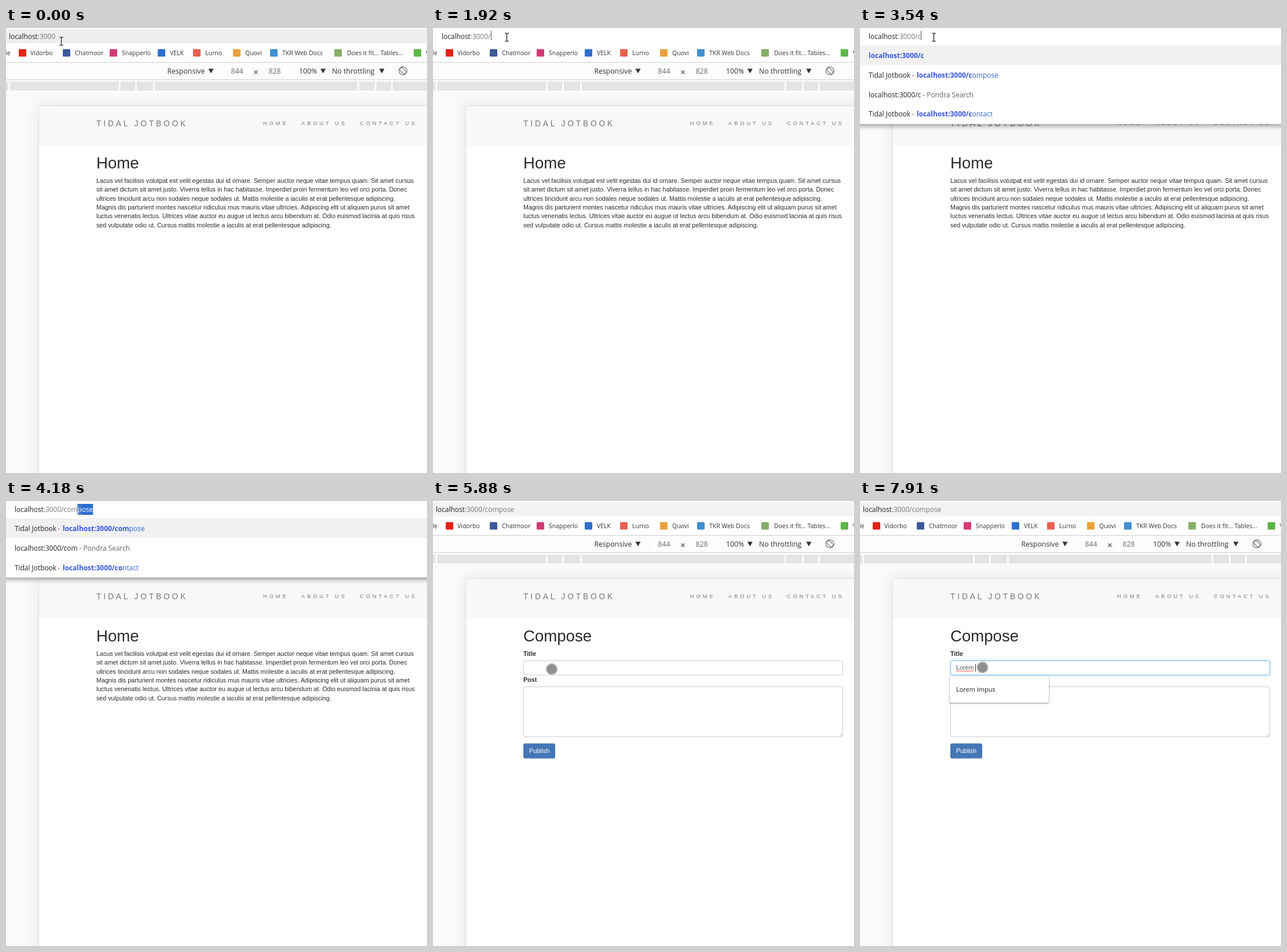
An HTML page for the animation above (8000 ms loop, 727 px wide and 770 px high).

```html
<!DOCTYPE html>
<html lang="en">
<head>
<meta charset="utf-8">
<title>Composing a post</title>
<style>
  html, body { margin: 0; width: 100%; height: 100%; overflow: hidden; background: #fafafa; }
  svg { display: block; width: 727px; height: 770px; }
  text { white-space: pre; font-family: "Open Sans", sans-serif; }
  .page text { font: 10.73px "Liberation Sans", Arial, sans-serif; fill: #2b2b2b; }
  .page .brand { font-size: 13.8px; letter-spacing: 3.83px; fill: #777; }
  .page .nav { font-size: 9.2px; letter-spacing: 4px; fill: #777; }
  .page .heading { font-size: 27.6px; }
  .page .label { font-weight: bold; }
  .field { fill: #fff; stroke: #ccc; }
  .focused { stroke: #7db8ea; filter: drop-shadow(0 0 2.5px #66afe980); }
  .tools { font-size: 12.3px; fill: #333; }
  .tools .size { fill: #666; }
  .bookmarks { font-size: 10.5px; fill: #333; }
  .omnibox { font-size: 11.9px; fill: #202124; }
  .path { fill: #777; }
  .selected { fill: #fff; }
  .dim { fill: #5f6368; }
  .link { fill: #3566d6; }
  .match { fill: #3557e0; font-weight: bold; }
</style>
</head>
<body>
<svg viewBox="0 0 727 770">
  <rect width="727" height="770" fill="#fafafa"/>

  <g class="page">
    <rect x="56" y="134" width="800" height="800" fill="#fff" style="filter:drop-shadow(0 0 11px #00000018)"/>
    <rect x="56" y="134" width="700" height="69.5" fill="#f8f8f8"/>
    <path d="M727 134.5H56.5V770" fill="none" stroke="#dfdfdf"/>
    <text class="brand" x="156" y="170">TIDAL JOTBOOK</text>
    <text class="nav" x="444" y="168">HOME</text>
    <text class="nav" x="510" y="168">ABOUT US</text>
    <text class="nav" x="611" y="168">CONTACT US</text>

    <g id="home"><text class="heading" x="156" y="243">Home</text></g>

    <g id="compose">
      <text class="heading" x="156" y="243">Compose</text>
      <text class="label" x="156" y="268">Title</text>
      <rect id="titleField" class="field" x="156.5" y="276.5" width="551" height="24.5" rx="3"/>
      <text id="title" x="166" y="292" style="fill:#555"></text>
      <path id="squiggle" fill="none" stroke="#e33" stroke-width=".9"/>
      <rect id="titleCaret" y="282" width="1" height="13" fill="#333"/>
      <text class="label" x="156" y="313">Post</text>
      <rect class="field" x="156.5" y="321.5" width="551" height="86.5" rx="3"/>
      <path d="M703 407l4-4M706 407l1-1" stroke="#888" stroke-width=".8"/>
      <rect x="156" y="419.5" width="55" height="26" rx="3" fill="#4577b6"/>
      <text x="166" y="436" style="fill:#fff">Publish</text>
      <g id="suggestion">
        <rect x="155" y="303" width="171" height="46" rx="2" fill="#fff" style="filter:drop-shadow(0 1px 1.5px #0007)"/>
        <text x="166" y="330" style="font:500 11px 'Open Sans',sans-serif;fill:#1f1f2b">Lorem impus</text>
      </g>
    </g>
  </g>

  <rect width="727" height="59" fill="#fff"/>
  <g id="bookmarks" class="bookmarks"></g>

  <g class="tools">
    <rect y="60" width="727" height="29" fill="#fcfcfc"/>
    <path d="M0 59.5H727M0 89.5H727" stroke="#cdcdcd"/>
    <path d="M378 65h45v19h-45zM441 65h45v19h-45z" fill="#fff"/>
    <text x="278.5" y="79">Responsive</text>
    <text class="size" x="388.5" y="79">844</text>
    <text class="size" x="453.5" y="79">828</text>
    <text x="506" y="79">100%</text>
    <text x="563" y="79">No throttling</text>
    <path d="M349.5 70.5h9l-4.5 8zM543 70.5h9l-4.5 8zM644.5 70.5h9l-4.5 8z" fill="#333"/>
    <path d="M428.5 73.5l6 6m0-6l-6 6" stroke="#555" stroke-width="1.2"/>
    <g fill="none" stroke="#666" stroke-width="1.1" transform="translate(685.5 74)">
      <rect x="-3" y="-6" width="6" height="12" rx="1" transform="rotate(-45)"/>
      <circle r="7"/>
    </g>
    <path d="M0 93h4v15H0zM7 93h188v15H7zM198 93h25v15h-25zM226 93h28v15h-28zM257 93h350v15H257zM610 93h27v15h-27zM640 93h25v15h-25zM668 93h59v15h-59z" fill="#e4e4e4"/>
  </g>

  <g class="omnibox">
    <g id="dropdown">
      <rect id="panel" x="-30" y="-30" width="790" fill="#fff"/>
      <rect y="30" width="727" height="34" fill="#f1f1f1"/>
      <g id="rows"></g>
    </g>
    <rect id="bar" y="2" width="727" height="24.5"/>
    <rect id="selection" y="5" height="19" fill="#2a6dd2"/>
    <text id="address" y="19"></text>
    <rect id="urlCaret" y="5" width="1" height="16" fill="#555"/>
  </g>

  <g id="pointer">
    <path id="beam" d="M-3.5 -7h2.5l1 1 1-1h2.5M0 -6V6M-3.5 7h2.5l1-1 1 1h2.5" fill="none" stroke="#111" stroke-width="1.2"/>
    <path id="arrow" d="M0 0v15l3.5-3.3 2.3 5 2-.9-2.2-4.9h5z" fill="#fff" stroke="#111"/>
    <circle id="touch" r="9.3" fill="#8f8f8f" stroke="#bdbdbd" stroke-width="1.8"/>
  </g>
</svg>

<script>
const LOOP = 8000, BLINK = 550;
const SITE = 'Tidal Jotbook', HOST = 'localhost', PORT = ':3000';
const el = Object.fromEntries([...document.querySelectorAll('[id]')].map(node => [node.id, node]));

const show = (node, on) => node.setAttribute('display', on ? 'inline' : 'none');
const set = (node, attrs) => Object.entries(attrs).forEach(([k, v]) => node.setAttribute(k, v));
const latest = (list, t) => list.findLast(item => item.at <= t);
const span = (cls, text) => `<tspan class="${cls}">${text}</tspan>`;
const lit = (start, t) => Math.floor((t - start) / BLINK) % 2 === 0;

const paragraph = [
  'Lacus vel facilisis volutpat est velit egestas dui id ornare. Semper auctor neque vitae tempus quam. Sit amet cursus',
  'sit amet dictum sit amet justo. Viverra tellus in hac habitasse. Imperdiet proin fermentum leo vel orci porta. Donec',
  'ultrices tincidunt arcu non sodales neque sodales ut. Mattis molestie a iaculis at erat pellentesque adipiscing.',
  'Magnis dis parturient montes nascetur ridiculus mus mauris vitae ultricies. Adipiscing elit ut aliquam purus sit amet',
  'luctus venenatis lectus. Ultrices vitae auctor eu augue ut lectus arcu bibendum at. Odio euismod lacinia at quis risus',
  'sed vulputate odio ut. Cursus mattis molestie a iaculis at erat pellentesque adipiscing.'
];
el.home.innerHTML += paragraph.map((line, i) =>
  `<text x="156" y="${Math.round(268 + i * 15.33)}">${line}</text>`).join('');

// icon x, icon colour, label x, label
const bookmarks = [
  [22, '#e62117', 42, 'Vidorbo'], [98, '#3b5998', 119, 'Chatmoor'], [179, '#d23a72', 200, 'Snapperlo'],
  [262, '#2f6fd0', 283, 'VELK'], [323, '#e8604f', 344, 'Lurno'], [392, '#e9a13b', 413, 'Quovi'],
  [456, '#3f8fd0', 477, 'TKR Web Docs'], [567, '#86ad6a', 589, 'Does it fit... Tables...'], [704, '#5eb548', 725, 'V']
];
el.bookmarks.innerHTML = '<text x="-1" y="46.5">le</text>' + bookmarks.map(([x, color, labelX, label]) =>
  `<rect x="${x}" y="36.5" width="13" height="13" rx="1.5" fill="${color}"/><text x="${labelX}" y="46.5">${label}</text>`).join('');

// Suggestion rows for the address bar
const visited = (typed, rest = '') =>
  `${SITE}<tspan x="89.5" class="dim">-</tspan><tspan x="98" class="match">${HOST + PORT + typed}</tspan>` + span('link', rest);
const search = typed => HOST + PORT + typed + span('dim', ' - Pondra Search');
const typedUrl = typed => span('match', HOST + PORT + typed);
const matches = typed => [
  visited(typed, '/compose'.slice(typed.length)),
  search(typed),
  visited(typed === '/c' ? '/c' : '/co', typed === '/c' ? 'ontact' : 'ntact')
];

const urlStates = [
  { at: 0, x: 5, path: '' },
  { at: 430, x: 5, path: '', open: true, all: true },
  { at: 910, x: 5, path: '', open: true },
  { at: 1920, x: 15, path: '/', open: true },
  { at: 2000, x: 15, path: '/', open: true, blink: 1920,
    rows: [visited('/'), search('/'), visited('/', 'compose'), visited('/', 'contact'), visited('/', 'about')] },
  { at: 2930, x: 15, path: '/c', rest: 'ompose', open: true, rows: matches('/c'), deep: true },
  { at: 3080, x: 15, path: '/co', rest: 'mpose', open: true, rows: matches('/co') },
  { at: 3540, x: 15, path: '/c', open: true, rows: [typedUrl('/c'), ...matches('/c')] },
  { at: 4090, x: 15, path: '/co', rest: 'mpose', open: true, rows: matches('/co') },
  { at: 4180, x: 15, path: '/com', rest: 'pose', open: true, rows: matches('/com') },
  { at: 4720, x: 5, path: '/compose', open: true, hideCaret: true },
  { at: 4790, x: 5, path: '/compose' }
];

const titleStates = [
  { at: 0, text: '' }, { at: 6120, text: '' }, { at: 6510, text: 'L' }, { at: 6810, text: 'Lo' },
  { at: 6980, text: 'Lor' }, { at: 7050, text: 'Lore' }, { at: 7680, text: 'Lorem' }, { at: 7910, text: 'Lorem ' }
];

// time, x, y
const pointerPath = [
  [0, 95.5, 23], [70, 95.5, 23], [330, 101, 32], [500, 112, 22], [590, 118, 18], [760, 118, 18],
  [1000, 127.5, 16], [5330, 127.5, 16], [5490, 128, 150], [5720, 190, 262], [5880, 205, 291],
  [6190, 205, 291], [6200, 211.5, 288], [LOOP, 211.5, 288]
];

function pointerAt(t) {
  const i = pointerPath.findIndex(point => point[0] > t);
  const [t0, x0, y0] = pointerPath[i - 1], [t1, x1, y1] = pointerPath[i];
  const k = (t - t0) / (t1 - t0);
  return [x0 + (x1 - x0) * k, y0 + (y1 - y0) * k];
}

let shownUrl;
function drawAddress(t) {
  const state = latest(urlStates, t);
  const { x, path, rest = '', rows = [], open, all } = state;
  if (state !== shownUrl) {
    shownUrl = state;
    el.address.setAttribute('x', x);
    el.address.innerHTML = all ? span('selected', HOST + PORT) : HOST + span('path', PORT + path) + span('selected', rest);
    const full = el.address.getComputedTextLength();
    const selected = all ? full : rest ? el.address.lastChild.getComputedTextLength() : 0;
    set(el.selection, { x: x + full - selected, width: selected });
    el.urlCaret.setAttribute('x', Math.round(x + full));
    show(el.dropdown, rows.length);
    el.panel.setAttribute('height', 61 + 33.8 * rows.length);
    el.panel.style.filter = state.deep ? 'drop-shadow(0 4px 6px #0009)' : 'drop-shadow(0 3px 4px #0006)';
    el.rows.innerHTML = rows.map((row, i) => `<text x="15" y="${Math.round(52 + i * 33.8)}">${row}</text>`).join('');
  }
  show(el.bar, !open);
  el.bar.setAttribute('fill', t < 5330 ? '#eeeff1' : '#f1f3f4');
  show(el.urlCaret, open && !all && !rest && !state.hideCaret && lit(state.blink ?? state.at, t));
}

let shownTitle;
function drawPage(t) {
  const composing = t >= 4950, focused = t >= 6120;
  show(el.home, !composing);
  show(el.compose, composing);
  el.titleField.classList.toggle('focused', focused);
  show(el.suggestion, t >= 6580);
  const state = latest(titleStates, t);
  if (composing && state !== shownTitle) {
    shownTitle = state;
    el.title.textContent = state.text;
    el.titleCaret.setAttribute('x', Math.round(166 + (state.text ? el.title.getComputedTextLength() : 0)));
  }
  show(el.titleCaret, focused && lit(state.at, t));
  show(el.squiggle, state.text.endsWith(' '));
}
el.squiggle.setAttribute('d', 'M166 295' + 'l2-1.5l2 1.5'.repeat(7) + 'l2-1.5');

function drawPointer(t) {
  const [x, y] = pointerAt(t);
  el.pointer.setAttribute('transform', `translate(${x} ${y})`);
  show(el.beam, y < 29);
  show(el.arrow, y >= 29 && y < 134);
  show(el.touch, y >= 134);
  el.beam.setAttribute('stroke', latest(urlStates, t).rest ? '#7d8fa8' : '#111');
}

function frame(now) {
  const t = now % LOOP;
  drawAddress(t);
  drawPage(t);
  drawPointer(t);
  requestAnimationFrame(frame);
}
requestAnimationFrame(frame);
</script>
</body>
</html>
```
